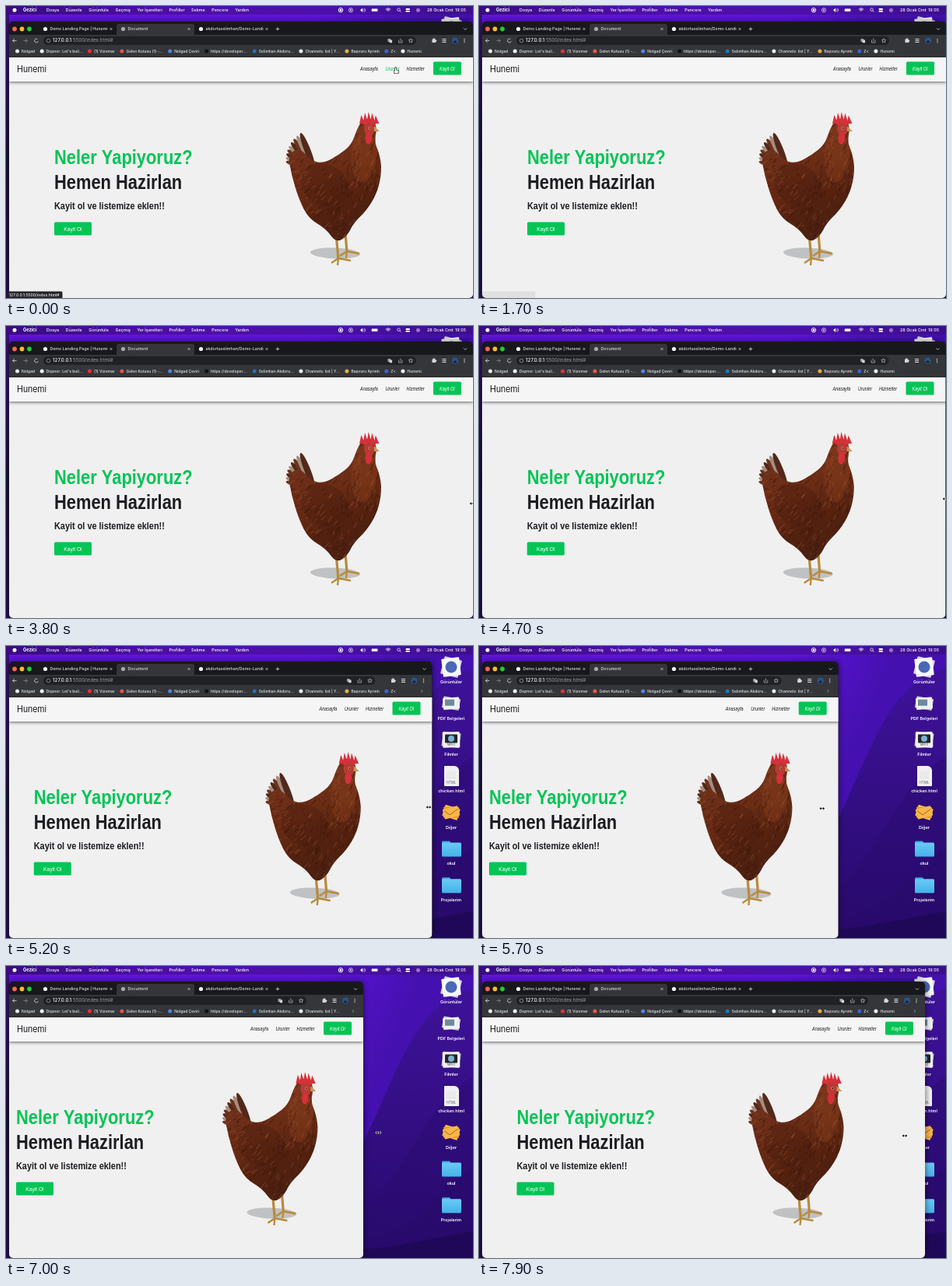
Write an HTML page with a canvas that moves like this. It is 600x375 px and loops after 8000 ms.

```html
<!DOCTYPE html>
<html lang="tr">
<head>
<meta charset="utf-8">
<style>
html, body { margin: 0; width: 100%; height: 100%; overflow: hidden; background: #1b1040; }
canvas { display: block; width: 100vw; height: 100vh; }
</style>
</head>
<body>
<canvas id="c"></canvas>
<script>
const W = 600, H = 375, LOOP = 8000, STEP = 100, LAG = 100;
const UI = 'Inter, "Noto Sans", sans-serif';
const PAGE = '"Liberation Sans", Arial, sans-serif';
const NARROW = 0.82; // condensed face used by the web page
const GREEN = '#04c455', INK = '#1c1d21', ICON = '#d5d7db';
const cv = document.getElementById('c'), ctx = cv.getContext('2d');
const dpr = Math.max(1, window.devicePixelRatio || 1);
cv.width = W * dpr;
cv.height = H * dpr;

// Pointer path: time, x, y
const PATH = [
  [0, 501, 83], [1100, 501, 83], [1700, 204, 198], [3800, 599, 228], [4700, 599, 222],
  [5100, 547, 208], [5200, 543, 207], [6100, 359, 210], [6400, 359, 210],
  [7600, 598, 218], [7700, 598, 218], [7900, 547, 218]
];
const MENU = ['Dosya', 'Düzenle', 'Görüntüle', 'Geçmiş', 'Yer İşaretleri', 'Profiller', 'Sekme', 'Pencere', 'Yardım'];
const BOOKMARKS = [
  ['Nolgad', '#e8e8ea'], ["Depnor: Let's buil...", '#f2f2f2'], ['(1) Vizomar', '#f0302c'],
  ['Gelen Kutusu (1) -...', '#ea5545'], ['Nolgad Çeviri', '#4a86e8'], ['https://developer....', '#101114'],
  ['Selimhan Akdoru...', '#2274b8'], ['Channels: list | Y...', '#e9e9e9'],
  ['Başvuru Ayrıntı', '#e7ad42'], ['Z<', '#3465d8'], ['Hunemi', '#eeeeff']
];
const TABS = [['Demo Landing Page | Hunemi', '#eeeeff'], ['Document', '#a7a9ad'], ['akdorluselimhan/Demo-Landing', '#f2f2f2']];
const FILES = [['Görüntüler', photos], ['PDF Belgeleri', papers], ['Filmler', films], ['chicken.html', htmlFile],
  ['Diğer', mixed], ['okul', folder], ['Projelerim', folder]];

function pointer(t) {
  const i = Math.max(1, PATH.findIndex(p => p[0] >= t));
  const a = PATH[i - 1], b = PATH[i];
  const k = Math.max(0, (t - a[0]) / (b[0] - a[0]));
  return [a[1] + (b[1] - a[1]) * k, a[2] + (b[2] - a[2]) * k];
}
const edge = t => t < 4700 ? W : Math.min(W, pointer(t - LAG)[0] + 0.5);

function rng(seed) {
  return () => (seed = (seed * 16807) % 2147483647) / 2147483647;
}
function rect(x, y, w, h, fill, r = 0) {
  ctx.fillStyle = fill;
  ctx.beginPath();
  ctx.roundRect(x, y, w, h, r);
  ctx.fill();
}
function oval(x, y, rx, ry, fill, angle = 0) {
  ctx.fillStyle = fill;
  ctx.beginPath();
  ctx.ellipse(x, y, rx, ry, angle, 0, Math.PI * 2);
  ctx.fill();
}
const dot = (x, y, r, fill) => oval(x, y, r, r, fill);
function ring(x, y, r, color, w = 0.7, from = 0, to = Math.PI * 2) {
  ctx.strokeStyle = color;
  ctx.lineWidth = w;
  ctx.beginPath();
  ctx.arc(x, y, r, from, to);
  ctx.stroke();
}
function trace(p) {
  ctx.beginPath();
  for (let i = 0; i < p.length; i += 2) ctx.lineTo(p[i], p[i + 1]);
}
function line(p, color, w = 0.8) {
  trace(p);
  ctx.strokeStyle = color;
  ctx.lineWidth = w;
  ctx.stroke();
}
function poly(p, fill) {
  trace(p);
  ctx.fillStyle = fill;
  ctx.fill();
}
// Closed curve through the midpoints of the corner list
function blob(p) {
  const at = i => p[i % p.length];
  const mid = i => [(at(i)[0] + at(i + 1)[0]) / 2, (at(i)[1] + at(i + 1)[1]) / 2];
  ctx.beginPath();
  ctx.moveTo(...mid(0));
  for (let i = 1; i <= p.length; i++) ctx.quadraticCurveTo(...at(i), ...mid(i));
}
function fade(x0, y0, x1, y1, ...cols) {
  const g = ctx.createLinearGradient(x0, y0, x1, y1);
  cols.forEach((c, i) => g.addColorStop(i / (cols.length - 1), c));
  return g;
}
function label(s, x, y, size, color = '#fff', weight = 500, align = 'left') {
  ctx.font = `${weight} ${size}px ${UI}`;
  ctx.textAlign = align;
  ctx.textBaseline = 'middle';
  ctx.fillStyle = color;
  ctx.fillText(s, x, y);
  return ctx.measureText(s).width;
}
function copy(s, x, y, size, color, style = '') {
  ctx.save();
  ctx.translate(x, y);
  ctx.scale(NARROW, 1);
  ctx.font = `${style} ${size}px ${PAGE}`;
  ctx.textAlign = 'left';
  ctx.textBaseline = 'alphabetic';
  ctx.fillStyle = color;
  ctx.fillText(s, 0, 0);
  ctx.restore();
}

function dune(f, fill) {
  ctx.beginPath();
  ctx.moveTo(0, H);
  for (let x = 0; x <= W; x += 10) ctx.lineTo(x, f(x));
  ctx.lineTo(W, H);
  ctx.fillStyle = fill;
  ctx.fill();
}
function wallpaper() {
  rect(0, 0, W, H, fade(0, 0, 0, H, '#6013e4', '#5f15d2', '#6118b4', '#861f9d', '#4a1089', '#2a0a66'));
  rect(0, 0, W, H, fade(400, 0, 520, 50, '#4410b000', '#4410b0'));
  ['#3f129b', '#360f88', '#2c0c74'].forEach((c, i) => {
    const ridge = x => 320 + 18 * i - (300 - 85 * i) / (1 + Math.exp((485 + 38 * i - x) / 33));
    dune(ridge, fade(0, 20, 0, H, c, '#280a6c'));
  });
  dune(x => 350 + 14 * Math.cos(x / 70), '#1f0858');
  rect(0, 11, 4, H, fade(0, 11, 0, H, '#3b1076', '#17103c', '#221052'));
}

function menuBar() {
  const y = 5.3;
  rect(0, 0, W, 11, fade(0, 0, W, 0, '#3b0b80', '#4d0fa6', '#4d10aa', '#3d0f8c'));
  dot(11, y, 2.5, '#fff');
  label('Gezici', 22, y, 5.7, '#fff', 700);
  MENU.reduce((x, s) => x + label(s, x, y, 5.4) + 8.6, 52);
  ring(430, y, 2.8, '#fff', 0.9);
  dot(430, y, 1.5, '#fff');
  ring(443, y, 2.6, '#fff');
  dot(443, y, 1, '#fff');
  poly([455, y, 458.2, y - 2.6, 458.2, y + 2.6], '#fff');
  for (const r of [2, 3.5]) ring(458, y, r, '#fff', 0.6, -0.8, 0.8);
  rect(469.5, 3.3, 8.5, 4, '#ffffff70', 1);
  rect(470, 3.8, 7, 3, '#fff', 0.7);
  for (const r of [1.6, 3, 4.4]) ring(491, 7.4, r, '#fff', 0.8, -2.4, -0.75);
  ring(504.5, 4.7, 1.8, '#fff');
  line([505.8, 6, 507.3, 7.6], '#fff');
  for (const d of [0, 2.7]) rect(513.5, 3 + d, 5.5, 2, '#fff', 1);
  dot(529.5, y, 2.6, '#9a6bd0');
  label('28 Ocak Cmt', 541, y, 5.4);
  label('19:05', 577, y, 5.4);
}

// Desktop icons, each drawn around its own centre
function sheet(w, h, angle, fill) {
  ctx.save();
  ctx.rotate(angle);
  rect(-w / 2, -h / 2, w, h, fill, 1);
  ctx.restore();
}
function photos() {
  sheet(23, 23, 0.25, '#d5d5dc');
  sheet(23, 23, -0.12, '#f7f7f7');
  dot(0, 0, 7.5, '#4868b8');
}
function papers() {
  sheet(22, 15, 0.18, '#c9cbd0');
  sheet(21, 15, -0.08, '#f0f0f2');
  rect(-8, -5, 12, 8, '#6c8a9b');
}
function films() {
  sheet(23, 19, 0.12, '#c9cbd0');
  sheet(22, 20, -0.04, '#f0f0f2');
  rect(-8, -7, 16, 11, '#22252c', 1);
  dot(0, -1.5, 4, '#7bb2cd');
  label('MPEG', 0, 7, 3.5, '#777', 600, 'center');
}
function htmlFile() {
  rect(-9, -13, 19, 26, '#f1f1f1', [1, 6, 1, 1]);
  for (let y = -5; y < 4; y += 2.5) line([-6, y, 6, y], '#ccc', 0.5);
  label('HTML', 0, 8.5, 4.5, '#888', 600, 'center');
}
function mixed() {
  ['#f8c44d', '#e79a31', '#f5b848'].forEach((c, i) => sheet(20, 15 - i, 0.3 - i * 0.28, c));
  line([-9, -2, -2, 3, 8, -4], '#a96222', 1);
}
function folder() {
  rect(-12, -10, 11, 6, '#42a9de', 1.5);
  rect(-12, -8, 25, 18, fade(0, -8, 0, 10, '#6acaf5', '#43b2e8'), 1.5);
}
function desktopIcons() {
  FILES.forEach(([name, icon], i) => {
    ctx.save();
    ctx.translate(572, 27 + i * 46.7);
    icon();
    label(name, 0, 19.3, 5.4, '#fff', 600, 'center');
    ctx.restore();
  });
}

function tabs(R) {
  const w = Math.min(100, (R - 62) / 3), y = 29.5, left = 42;
  ['#ff5f57', '#febc2e', '#28c840'].forEach((c, i) => dot(11 + i * 9.5, y, 2.9, c));
  rect(left + w, 23, w, 18, '#35363a', 3);
  TABS.forEach(([s, color], i) => {
    const x = left + i * w, c = x + w - 7;
    dot(x + 8.5, y, 2.6, color);
    ctx.save();
    ctx.beginPath();
    ctx.rect(x, 22, w - 11, 15);
    ctx.clip();
    label(s, x + 14.5, y, 5.25, '#dfe1e5');
    ctx.restore();
    for (const d of [-1.5, 1.5]) line([c - 1.5, y - d, c + 1.5, y + d], ICON, 0.7);
  });
  const p = left + 3 * w + 7;
  line([p - 2.3, y, p + 2.3, y], ICON);
  line([p, y - 2.3, p, y + 2.3], ICON);
  line([R - 12, y - 1, R - 10, y + 1, R - 8, y - 1], ICON);
}

function arrow(x, y, dir, color) {
  const tip = x + 2.5 * dir;
  line([x - 2.5 * dir, y, tip, y], color);
  line([x, y - 2.4, tip, y, x, y + 2.4], color);
}
function toolbar(R) {
  const y = 44.5;
  rect(4, 37, R - 4, 29, '#35363a');
  arrow(11, y, -1, ICON);
  arrow(25, y, 1, '#85878b');
  ring(39, y, 2.4, ICON, 0.8, 0.3, 5.4);
  rect(48, 39, R - 121, 11, '#202124', 5.5);
  ring(54.5, y, 2.3, '#bbb', 0.6);
  const w = label('127.0.0.1', 60, y, 6.2, '#f1f3f4');
  label(':5500/index.html#', 60 + w, y, 6.2, '#9aa0a6', 400);
  rect(R - 109.5, 42, 3.6, 4, '#9da0a5', 0.5);
  rect(R - 107.3, 43.6, 3.4, 3.6, ICON, 0.5);
  line([R - 95.5, 43.5, R - 95.5, 47, R - 91, 47, R - 91, 43.5], ICON, 0.6);
  line([R - 93.2, 45.6, R - 93.2, 41.4], ICON, 0.6);
  const star = [];
  for (let i = 0; i < 11; i++) {
    const a = (i / 5 - 0.5) * Math.PI, r = i % 2 ? 1.3 : 2.9;
    star.push(R - 80 + r * Math.cos(a), y + r * Math.sin(a));
  }
  line(star, ICON, 0.6);
  rect(R - 52.5, 42.5, 4.6, 4.6, ICON, 0.7);
  dot(R - 50.2, 42.3, 1.1, ICON);
  dot(R - 47.7, 44.8, 1.1, ICON);
  for (const d of [-2, 0, 2]) {
    rect(R - 39.5, y + d - 0.4, 5, 0.8, ICON);
    dot(R - 11, y + d, 0.65, ICON);
  }
  dot(R - 23, y, 4, '#27548b');
  rect(R - 25, y, 4, 3, '#162333', 1.5);
  let x = 20;
  for (const [s, color] of BOOKMARKS) {
    ctx.font = `500 5px ${UI}`;
    if (x + ctx.measureText(s).width > R - 23) break;
    dot(x - 5.5, 58, 2.5, color);
    x += label(s, x, 58.2, 5, '#e4e6e9') + 14.6;
  }
  if (R < 575) line([R - 14, 56.3, R - 12.3, 58, R - 14, 59.7], ICON, 0.6);
}

const BODY = [[362, 190], [378, 182], [392, 199], [408, 202], [428, 191], [444, 178], [451, 158], [458, 146],
  [470, 144], [477, 156], [473, 174], [480, 190], [483, 212], [477, 240], [463, 263], [447, 278], [438, 296],
  [424, 304], [411, 286], [389, 273], [377, 250], [367, 218]];

function foot(x, y, top) {
  const c = '#b98a3a';
  line([x - 3, top, x, y], c, 3.2);
  for (const [dx, dy] of [[-9, 5], [-1, 8], [16, 2]]) line([x, y - 1, x + dx, y + dy], c, 2.3);
}
function tail() {
  for (let i = 0; i < 9; i++) {
    const a = -2.95 + i * 0.125, len = 37 + i * 1.3;
    const x = 396 + Math.cos(a) * len / 2, y = 207 + Math.sin(a) * len / 2;
    oval(x, y, len / 2, 4, ['#6b321d', '#a48d7e', '#53281a'][i % 3], a);
  }
}
function head() {
  const red = '#d6303a';
  for (let i = 0; i < 5; i++) {
    const x = 457 + i * 4.6, up = 142 - 6 * Math.sin((i + 0.6) / 5 * Math.PI);
    poly([x - 3, 151, x - 0.5, up, x + 4, 151], red);
  }
  oval(467, 150, 9, 4, red);
  oval(467, 158, 7, 8, '#b83a35');
  oval(466, 170, 4.2, 7.5, red, 0.1);
  poly([473, 154, 480, 161, 473, 161], '#c79759');
  dot(467.5, 157, 1.8, '#df9b50');
  dot(467.7, 157, 0.9, '#16100e');
}
function hen(dx) {
  ctx.save();
  ctx.translate(dx, 0);
  oval(423, 317.5, 32, 7, '#c0c1c2', 0.04);
  foot(427, 325, 292);
  foot(438, 316, 280);
  tail();
  blob(BODY);
  ctx.fillStyle = fade(380, 180, 440, 300, '#6f301a', '#6a2c15', '#54210f', '#4a2012');
  ctx.fill();
  ctx.save();
  ctx.clip();
  oval(461, 185, 17, 42, '#8d431e66', 0.1);
  oval(410, 230, 32, 26, '#43180c55', 0.5);
  const rnd = rng(41);
  for (let i = 0; i < 420; i++) {
    const x = 355 + rnd() * 128, y = 145 + rnd() * 158, l = 3 + rnd() * 7;
    const a = 2.6 - (x - 355) / 128 + rnd() * 0.4;
    line([x, y, x + Math.cos(a) * l, y + Math.sin(a) * l], rnd() < 0.6 ? '#2c0f0766' : '#b0663c55', 1.1);
  }
  ctx.restore();
  head();
  ctx.restore();
}

function button(x, y, w, pad, size, style) {
  rect(x, y, w, 17, GREEN, 1.6);
  copy('Kayit Ol', x + pad, y + 11.3, size, '#fff', style);
}
function page(R, hover) {
  rect(4, 66, R - 4, H - 66, '#f0f0f0');
  ctx.save();
  ctx.shadowColor = '#0009';
  ctx.shadowBlur = 4 * dpr;
  ctx.shadowOffsetY = dpr;
  rect(4, 66, R - 4, 31, '#f5f5f5');
  ctx.restore();
  copy('Hunemi', 14, 85, 13.4, INK);
  copy('Anasayfa', R - 145, 82.6, 6.7, INK, 'italic');
  copy('Urunler', R - 112.5, 82.6, 6.7, hover ? GREEN : INK, 'italic');
  copy('Hizmetler', R - 85.5, 82.6, 6.7, INK, 'italic');
  button(R - 51, 71.6, 36, 8, 6.8, 'italic');

  const x = Math.max(13, 62 + (R - W) / 2);
  const wrap = R < 376, shift = wrap ? 16 : 0;
  const lines = wrap ? ['Neler', 'Yapiyoruz?'] : ['Neler Yapiyoruz?'];
  lines.forEach((s, i) => copy(s, x, 203 - shift + i * 32, 26.7, GREEN, 'bold'));
  copy('Hemen Hazirlan', x, 235 + shift, 26.7, INK, 'bold');
  copy('Kayit ol ve listemize eklen!!', x, 260.5 + shift, 13.3, INK, 'bold');
  button(x, 277.5 + shift, 48, 12.3, 8.1, '');
  hen(R > 502 ? (R - W) / 2 : -49 + (R - 502) * 0.76);
}

function status(t) {
  ctx.save();
  ctx.globalAlpha = t > 1700 ? 0 : Math.min(1, 1 - (t - 1200) / 540);
  rect(2, 366.5, 70.5, 10, '#242529', 1.5);
  label('127.0.0.1:5500/index.html#', 4, 371, 5.1, '#f1f1f1');
  ctx.restore();
}

function browser(t) {
  const R = edge(t);
  ctx.save();
  ctx.shadowColor = '#0009';
  ctx.shadowBlur = 8 * dpr;
  rect(4, 20, R - 4, H - 20, '#17181b', 5);
  ctx.restore();
  ctx.save();
  ctx.beginPath();
  ctx.roundRect(4, 20, R - 4, H - 20, 5);
  ctx.clip();
  tabs(R);
  toolbar(R);
  page(R, t < 1200);
  ctx.restore();
  status(t);
}

function cursor(t) {
  ctx.save();
  ctx.translate(...pointer(t));
  if (t < 1200) {
    for (const [grow, c] of [[0.6, '#111'], [0, '#fff']]) {
      rect(-1 - grow, -4 - grow, 1.4 + 2 * grow, 6 + 2 * grow, c, 0.7);
      rect(-2 - grow, -0.5 - grow, 5 + 2 * grow, 4 + 2 * grow, c, 1.2);
    }
  } else if (t >= 1600 && t < 1900) {
    line([0, -4, 0, 4], '#fff', 1.2);
    line([0, -4, 0, 4], '#444', 0.6);
  } else if (t < 3700) {
    const shape = [0, 0, 0, 7, 1.7, 5.5, 5, 5, 0, 0];
    poly(shape, '#111');
    line(shape, '#fff', 0.6);
  } else {
    line([-3.6, 0, 3.6, 0], '#fff', 2.6);
    line([-2.5, 0, 2.5, 0], '#111', 0.9);
    for (const d of [-1, 1]) poly([3.4 * d, 0, 1.2 * d, -1.8, 1.2 * d, 1.8], '#111');
  }
  ctx.restore();
}

function draw(t) {
  ctx.setTransform(dpr, 0, 0, dpr, 0, 0);
  wallpaper();
  desktopIcons();
  menuBar();
  browser(t);
  cursor(t);
}
const start = performance.now();
function tick() {
  const t = (performance.now() - start) % LOOP;
  draw(Math.floor(t / STEP) * STEP);
  requestAnimationFrame(tick);
}
tick();
</script>
</body>
</html>
```
